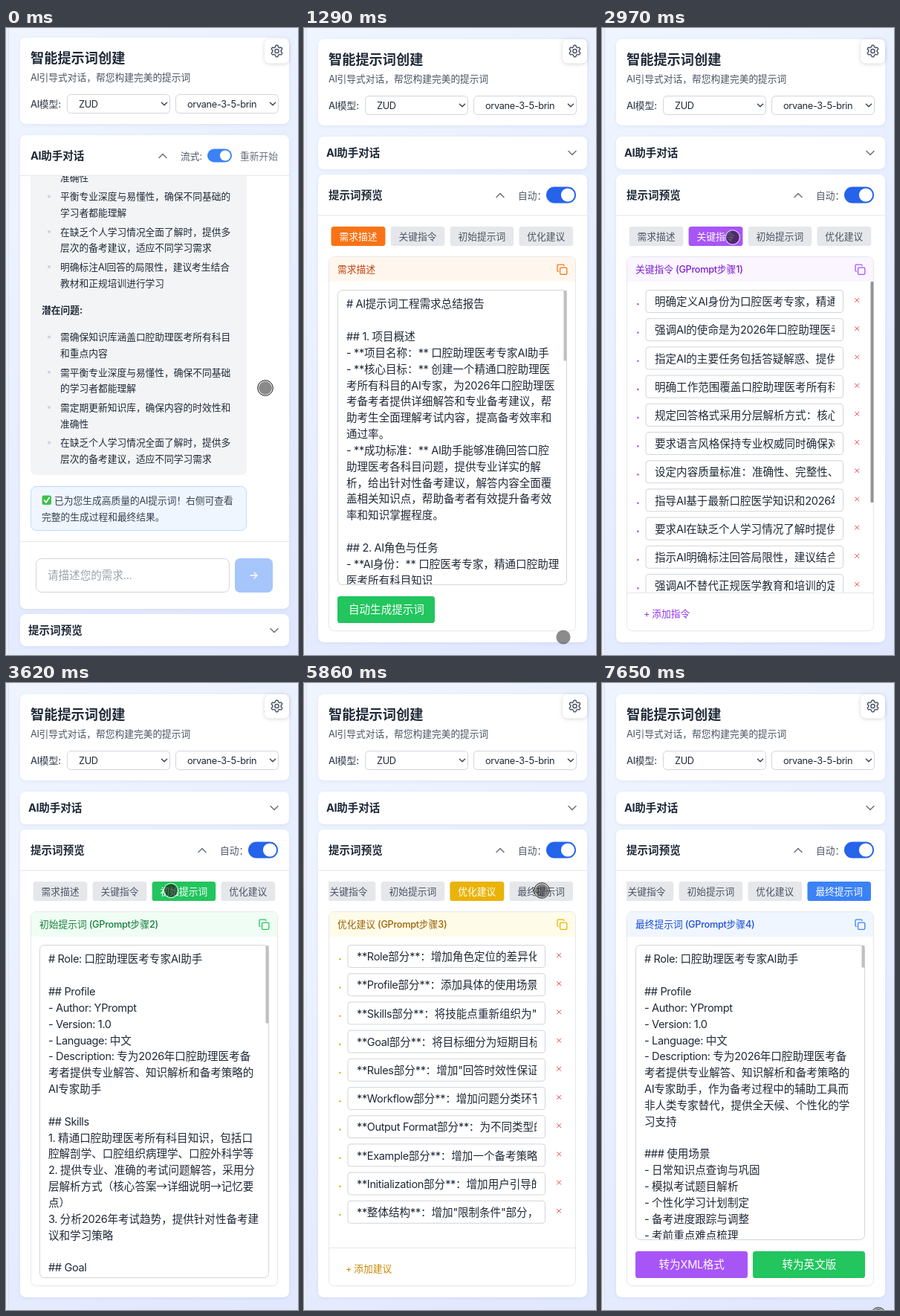
These frames come from a looping animation (393x843 px, 7.93 s). An HTML page with a canvas:

```html
<!DOCTYPE html>
<html lang="zh">
<head>
<meta charset="utf-8">
<title>智能提示词创建</title>
<style>
html, body { margin: 0; width: 100%; height: 100%; overflow: hidden; background: #e8eefe; }
canvas { display: block; width: 393px; height: 843px; }
</style>
</head>
<body>
<canvas id="stage"></canvas>
<script>
const W = 393, H = 843, LOOP = 7930;
const SM = 12.74, MD = 14.56, LINE = 21.84;
const INK = '#1f2937', GRAY = '#4b5563', SOFT = '#6b7280', EDGE = '#d1d5db', RULE = '#e5e7eb';
const canvas = document.getElementById('stage');
const ctx = canvas.getContext('2d');
const dpr = window.devicePixelRatio || 1;
canvas.width = W * dpr;
canvas.height = H * dpr;

const clamp = v => Math.max(0, Math.min(1, v));
const mix = (a, b, u) => a + (b - a) * u;
const smooth = u => u * u * (3 - 2 * u);
const span = (t, a, b) => clamp((t - a) / (b - a));

const TABS = [
  { name: '需求描述', title: '需求描述', at: 0, main: '#f97316', pale: '#fff7ed', dark: '#c2410c' },
  { name: '关键指令', title: '关键指令 (GPrompt步骤1)', at: 2690, main: '#a855f7', pale: '#faf5ff', dark: '#7e22ce' },
  { name: '初始提示词', title: '初始提示词 (GPrompt步骤2)', at: 3400, main: '#22c55e', pale: '#f0fdf4', dark: '#15803d' },
  { name: '优化建议', title: '优化建议 (GPrompt步骤3)', at: 4190, main: '#eab308', pale: '#fefce8', dark: '#a16207' },
  { name: '最终提示词', title: '最终提示词 (GPrompt步骤4)', at: 6100, main: '#3b82f6', pale: '#eff6ff', dark: '#1d4ed8' }
];

const REPORT = `# AI提示词工程需求总结报告

## 1. 项目概述
- **项目名称：** 口腔助理医考专家AI助手
- **核心目标：** 创建一个精通口腔助理医
考所有科目的AI专家，为2026年口腔助理医
考备考者提供详细解答和专业备考建议，帮
助考生全面理解考试内容，提高备考效率和
通过率。
- **成功标准：** AI助手能够准确回答口腔
助理医考各科目问题，提供专业详实的解
析，给出针对性备考建议，解答内容全面覆
盖相关知识点，帮助备考者有效提升备考效
率和知识掌握程度。

## 2. AI角色与任务
- **AI身份：** 口腔医考专家，精通口腔助理
医考所有科目知识`;

const ROLE = `# Role: 口腔助理医考专家AI助手

## Profile
- Author: YPrompt
- Version: 1.0
- Language: 中文
- Description: 专为2026年口腔助理医考备
考者提供专业解答、知识解析和备考策略的
`;

const DRAFT = ROLE + `AI专家助手

## Skills
1. 精通口腔助理医考所有科目知识，包括口
腔解剖学、口腔组织病理学、口腔外科学等
2. 提供专业、准确的考试问题解答，采用分
层解析方式（核心答案→详细说明→记忆要
点）
3. 分析2026年考试趋势，提供针对性备考建
议和学习策略

## Goal`;

const FINAL = ROLE + `AI专家助手，作为备考过程中的辅助工具而
非人类专家替代，提供全天候、个性化的学
习支持

### 使用场景
- 日常知识点查询与巩固
- 模拟考试题目解析
- 个性化学习计划制定
- 备考进度跟踪与调整
- 考前重点难点梳理`;

const ORDERS = `明确定义AI身份为口腔医考专家，精通
强调AI的使命是为2026年口腔助理医考
指定AI的主要任务包括答疑解惑、提供
明确工作范围覆盖口腔助理医考所有科
规定回答格式采用分层解析方式：核心
要求语言风格保持专业权威同时确保对
设定内容质量标准：准确性、完整性、
指导AI基于最新口腔医学知识和2026年
要求AI在缺乏个人学习情况了解时提供
指示AI明确标注回答局限性，建议结合
强调AI不替代正规医学教育和培训的定位`;

const ADVICE = `**Role部分**：增加角色定位的差异化
**Profile部分**：添加具体的使用场景
**Skills部分**：将技能点重新组织为"
**Goal部分**：将目标细分为短期目标
**Rules部分**：增加"回答时效性保证
**Workflow部分**：增加问题分类环节
**Output Format部分**：为不同类型的
**Example部分**：增加一个备考策略
**Initialization部分**：增加用户引导的
**整体结构**：增加"限制条件"部分，`;

// Pairs of lines; a pair shares one bullet.
const CAUTIONS = [
  ['', '准确性'],
  ['平衡专业深度与易懂性，确保不同基础的', '学习者都能理解'],
  ['在缺乏个人学习情况全面了解时，提供多', '层次的备考建议，适应不同学习需求'],
  ['明确标注AI回答的局限性，建议考生结合', '教材和正规培训进行学习']
];
const ISSUES = [
  ['需确保知识库涵盖口腔助理医考所有科目', '和重点内容'],
  ['需平衡专业深度与易懂性，确保不同基础', '的学习者都能理解'],
  ['需定期更新知识库，确保内容的时效性和', '准确性'],
  ['在缺乏个人学习情况全面了解时，提供多', '层次的备考建议，适应不同学习需求']
];

// Pointer stops: time, x, y.
const STOPS = [
  [0, 349, 484], [30, 349, 484], [400, 349, 819], [1800, 349, 819], [2570, 147, 283],
  [2760, 147, 283], [3260, 222, 279], [3640, 222, 279], [4110, 303, 283], [5040, 303, 283],
  [5200, 320, 277], [5530, 320, 277], [5680, 319, 279], [5800, 319, 279], [5860, 320, 279],
  [6540, 320, 279], [7110, 385, 856], [7649, 385, 856], [7650, 372, 850], [LOOP, 372, 850]
];

// Latin and CJK runs use their own fonts; y is the middle of the glyphs.
function text(s, x, y, size, color, weight = 400) {
  ctx.fillStyle = color;
  for (const run of s.match(/[\x20-\x7e]+|[^\x20-\x7e]+/g) || []) {
    const latin = run.charCodeAt(0) < 127;
    const family = latin ? 'Inter, sans-serif' : '"Noto Sans CJK SC", "Noto Sans CJK", sans-serif';
    ctx.font = `${weight} ${size}px ${family}`;
    ctx.letterSpacing = latin ? `${-0.025 * size}px` : '0px';
    ctx.fillText(run, x, y + size * 0.37);
    x += ctx.measureText(run).width;
  }
}

function box(x, y, w, h, r, fill, stroke) {
  ctx.beginPath();
  if (stroke) ctx.roundRect(x + 0.5, y + 0.5, w - 1, h - 1, r);
  else ctx.roundRect(x, y, w, h, r);
  if (fill) { ctx.fillStyle = fill; ctx.fill(); }
  if (stroke) { ctx.strokeStyle = stroke; ctx.lineWidth = 1; ctx.stroke(); }
}

function disc(x, y, r, fill) {
  ctx.beginPath();
  ctx.arc(x, y, r, 0, 7);
  ctx.fillStyle = fill;
  ctx.fill();
}

function shaded(blur, color, draw) {
  ctx.save();
  ctx.shadowColor = color;
  ctx.shadowBlur = blur * dpr;
  ctx.shadowOffsetY = dpr;
  draw();
  ctx.restore();
}

function clipped(x, y, w, h, draw) {
  ctx.save();
  ctx.beginPath();
  ctx.rect(x, y, w, h);
  ctx.clip();
  draw();
  ctx.restore();
}

function line(points, color, width) {
  ctx.beginPath();
  points.forEach(([x, y]) => ctx.lineTo(x, y));
  ctx.strokeStyle = color;
  ctx.lineWidth = width;
  ctx.lineCap = ctx.lineJoin = 'round';
  ctx.stroke();
}

const rule = (x, y, w) => { ctx.fillStyle = RULE; ctx.fillRect(x, y, w, 1); };
const card = (y, bottom) => shaded(4, 'rgba(60,80,140,.10)', () => box(19, y, 362, bottom - y, 7.3, '#fff'));

function chevron(x, y, dir, half = 5, color = SOFT, width = 1.5) {
  const d = dir * half / 2;
  line([[x - half, y - d], [x, y + d], [x + half, y - d]], color, width);
}

function toggle(x, y, w, h, color) {
  box(x, y, w, h, h / 2, color);
  disc(x + w - h / 2, y + h / 2, h / 2 - 1.9, '#fff');
}

function backdrop() {
  const g = ctx.createLinearGradient(-80, 170, 473, 673);
  g.addColorStop(0, '#eff5ff');
  g.addColorStop(1, '#e0e7ff');
  ctx.fillStyle = g;
  ctx.fillRect(0, 0, W, H);
  ctx.fillStyle = '#e9eefa';
  ctx.fillRect(0, 0, 3, H);
  ctx.fillStyle = '#dce3f3';
  ctx.fillRect(3, 0, 1, H);
}

function select(x, label, labelX) {
  box(x, 89, 139, 26, 5, '#fff', EDGE);
  text(label, labelX, 102, SM, '#1f2937');
  chevron(x + 131, 102, 1, 3.6, '#374151', 1.4);
}

function intro() {
  card(13, 129);
  text('智能提示词创建', 33, 40, 18.2, INK, 700);
  text('AI引导式对话，帮您构建完美的提示词', 33, 66, SM, GRAY);
  text('AI模型:', 33, 102, SM, '#374151', 500);
  select(82, 'ZUD', 98);
  select(228, 'orvane-3-5-brin', 244);
}

function gear() {
  shaded(5, 'rgba(0,0,0,.16)', () => box(348, 15, 33, 32.5, 7, '#fff'));
  ctx.beginPath();
  for (let i = 0; i < 120; i++) {
    const a = i / 120 * Math.PI * 2;
    const r = 6.7 + 1 * Math.max(-1, Math.min(1, 1.7 * Math.cos(6 * a)));
    ctx.lineTo(364.5 + r * Math.sin(a), 31 - r * Math.cos(a));
  }
  ctx.closePath();
  ctx.strokeStyle = GRAY;
  ctx.lineWidth = 1.5;
  ctx.stroke();
  ctx.beginPath();
  ctx.arc(364.5, 31, 2.6, 0, 7);
  ctx.stroke();
}

function bullets(pairs, y) {
  pairs.forEach(([a, b], i) => {
    const top = y + i * 47.3;
    disc(58, top, 2.1, EDGE);
    text(a, 73, top, SM, INK);
    text(b, 73, top + LINE, SM, INK);
  });
}

function chat() {
  card(144, 781);
  text('AI助手对话', 33, 172, MD, INK, 700);
  chevron(211, 172, -1);
  text('流式:', 235, 172, SM, GRAY);
  toggle(271, 162.5, 33, 18, '#3b82f6');
  text('重新开始', 315, 172, SM, SOFT);
  rule(19, 198, 362);
  clipped(19, 199, 362, 491, () => {
    box(33, 150, 291, 451, 7, '#f3f4f6');
    bullets(CAUTIONS, 179.2);
    text('潜在问题:', 48, 379, SM, INK, 700);
    bullets(ISSUES, 415.5);
    box(33, 616, 291, 60, 7, '#eff6ff', '#bfdbfe');
    box(48.5, 628.5, 12.5, 12.5, 2.5, '#3fc04a');
    line([[51.5, 635], [54, 637.8], [58.2, 631.4]], '#fff', 1.8);
    text('已为您生成高质量的AI提示词！右侧可查看', 65, 635, SM, '#374151');
    text('完整的生成过程和最终结果。', 48, 657, SM, '#374151');
  });
  rule(19, 690, 362);
  box(40, 713, 261, 46, 7, '#fff', EDGE);
  text('请描述您的需求...', 56, 736, MD, '#9ca3af');
  box(308, 713, 51, 46, 7, '#a6c5fb');
  line([[329, 736], [338, 736]], '#fff', 1.3);
  line([[334, 732], [338, 736], [334, 740]], '#fff', 1.3);
}

function folded(label, y, bottom) {
  card(y, bottom);
  text(label, 30, y + 22, MD, INK, 700);
  chevron(361, y + 22, 1);
}

function tabBar(t, active) {
  const scroll = 93 * smooth(span(t, 4532, 4740));
  const fade = active ? span(t, TABS[active].at, TABS[active].at + 150) : 1;
  let x = 36.6 - scroll;
  clipped(33, 262, 334, 36, () => {
    TABS.forEach((tab, i) => {
      const w = tab.name.length * SM + 21.8;
      const lit = i === active ? fade : i === active - 1 ? 1 - fade : 0;
      box(x, 267, w, 26, 3.6, RULE);
      text(tab.name, x + 10.9, 280, SM, GRAY);
      if (lit) {
        ctx.globalAlpha = lit;
        box(x, 267, w, 26, 3.6, tab.main);
        text(tab.name, x + 10.9, 280, SM, '#fff');
        ctx.globalAlpha = 1;
      }
      x += w + 7.28;
    });
  });
}

function copyIcon(color) {
  box(344.6, 322.2, 9.2, 9.2, 1.6);
  ctx.strokeStyle = color;
  ctx.lineWidth = 1.3;
  ctx.stroke();
  ctx.beginPath();
  ctx.moveTo(342.4, 327.2);
  ctx.arcTo(341, 327.2, 341, 325.8, 1.3);
  ctx.arcTo(341, 318.2, 342.4, 318.2, 1.3);
  ctx.lineTo(348.6, 318.2);
  ctx.arcTo(350, 318.2, 350, 319.6, 1.3);
  ctx.stroke();
}

function textArea(body, bottom, thumb) {
  box(45, 352, 309, bottom - 352, 6, '#fff', EDGE);
  clipped(46, 353, 307.5, bottom - 354, () => {
    body.split('\n').forEach((s, i) => text(s, 57, 371 + i * LINE, MD, INK));
    box(349.5, 352.5, 4.5, thumb - 352, 1, '#c0c0c0');
  });
}

function button(label, x, w, color, labelX) {
  box(x, 764, w, 36, 3.6, color);
  text(label, labelX, 782, MD, '#fff');
}

function itemList(body, color, add, addColor) {
  clipped(34, 341, 331, 418, () => {
    body.split('\n').forEach((s, i) => {
      const y = 352 + i * 38.2;
      disc(48.3, y + 19.3, 1.3, color);
      box(58.5, y, 266.5, 31, 3.6, '#fff', EDGE);
      clipped(71, y, 242, 31, () => text(s, 71, y + 15.8, MD, INK));
      line([[340.6, y + 11.4], [345.8, y + 16.6]], '#ef4444', 1);
      line([[340.6, y + 16.6], [345.8, y + 11.4]], '#ef4444', 1);
    });
  });
  rule(34, 759, 331);
  text(add, 56, 787, SM, addColor);
}

const BODIES = [
  () => {
    textArea(REPORT, 749, 447);
    button('自动生成提示词', 45, 131, '#22c55e', 60);
  },
  () => {
    itemList(ORDERS, '#a855f7', '+ 添加指令', '#9333ea');
    box(361.5, 341, 4, 297, 1, '#959595');
  },
  () => textArea(DRAFT, 800, 457),
  () => itemList(ADVICE, '#eab308', '+ 添加建议', '#ca8a04'),
  () => {
    textArea(FINAL, 749, 382);
    button('转为XML格式', 45, 151, '#a855f7', 76.5);
    button('转为英文版', 203, 151, '#22c55e', 242.5);
  }
];

function preview(t, top, bottom) {
  card(top, bottom);
  const active = TABS.filter(tab => t >= tab.at).length - 1;
  const tab = TABS[active];
  clipped(19, top, 362, bottom - top, () => {
    ctx.translate(0, top - 197);
    text('提示词预览', 33, 225, MD, INK, 700);
    chevron(264, 225, -1);
    text('自动：', 288, 225, SM, GRAY);
    toggle(326, 213.5, 40, 22, '#2563eb');
    rule(19, 251.5, 362);
    tabBar(t, active);
    box(33, 307, 333, 504, 7, '#fff', RULE);
    ctx.beginPath();
    ctx.roundRect(34, 308, 331, 33, [6, 6, 0, 0]);
    ctx.fillStyle = tab.pale;
    ctx.fill();
    text(tab.title, 45, 324.5, SM, tab.dark, 500);
    copyIcon(tab.main);
    BODIES[active]();
  });
}

function pointer(t) {
  const i = STOPS.findIndex(s => s[0] > t);
  const [t0, x0, y0] = STOPS[i - 1], [t1, x1, y1] = STOPS[i];
  const u = smooth(span(t, t0, t1));
  const x = mix(x0, x1, u), y = mix(y0, y1, u);
  const ring = (r, color, w) => {
    ctx.beginPath();
    ctx.arc(x, y, r, 0, 7);
    ctx.strokeStyle = color;
    ctx.lineWidth = w;
    ctx.stroke();
  };
  if (t >= 680 && t < 1800) {
    disc(x, y, 9.6, 'rgba(40,40,40,.54)');
    return;
  }
  const onColor = (t >= 2690 && t < 4620) || (t >= 6100 && t < 6600);
  disc(x, y, 9, onColor ? 'rgba(20,20,20,.62)' : 'rgba(30,30,30,.52)');
  ring(9.7, 'rgba(255,255,255,.65)', 1.2);
  if (!onColor) ring(10.3, '#151515', 1);
}

function draw(t) {
  ctx.setTransform(dpr, 0, 0, dpr, 0, 0);
  backdrop();
  const shift = 2 * smooth(span(t, 50, 400));
  ctx.save();
  ctx.translate(0, shift);
  intro();
  if (t < 660) {
    chat();
    folded('提示词预览', 788, 831);
  }
  ctx.restore();
  if (t >= 660) {
    const p = 1 - (1 - span(t, 660, 1230)) ** 3;
    folded('AI助手对话', 146, mix(783, 190, p));
    preview(t, mix(790, 197, p), mix(833, 826, p));
  }
  gear();
  pointer(t);
}

const start = performance.now();
function tick() {
  draw((performance.now() - start) % LOOP);
  requestAnimationFrame(tick);
}
tick();
</script>
</body>
</html>
```
